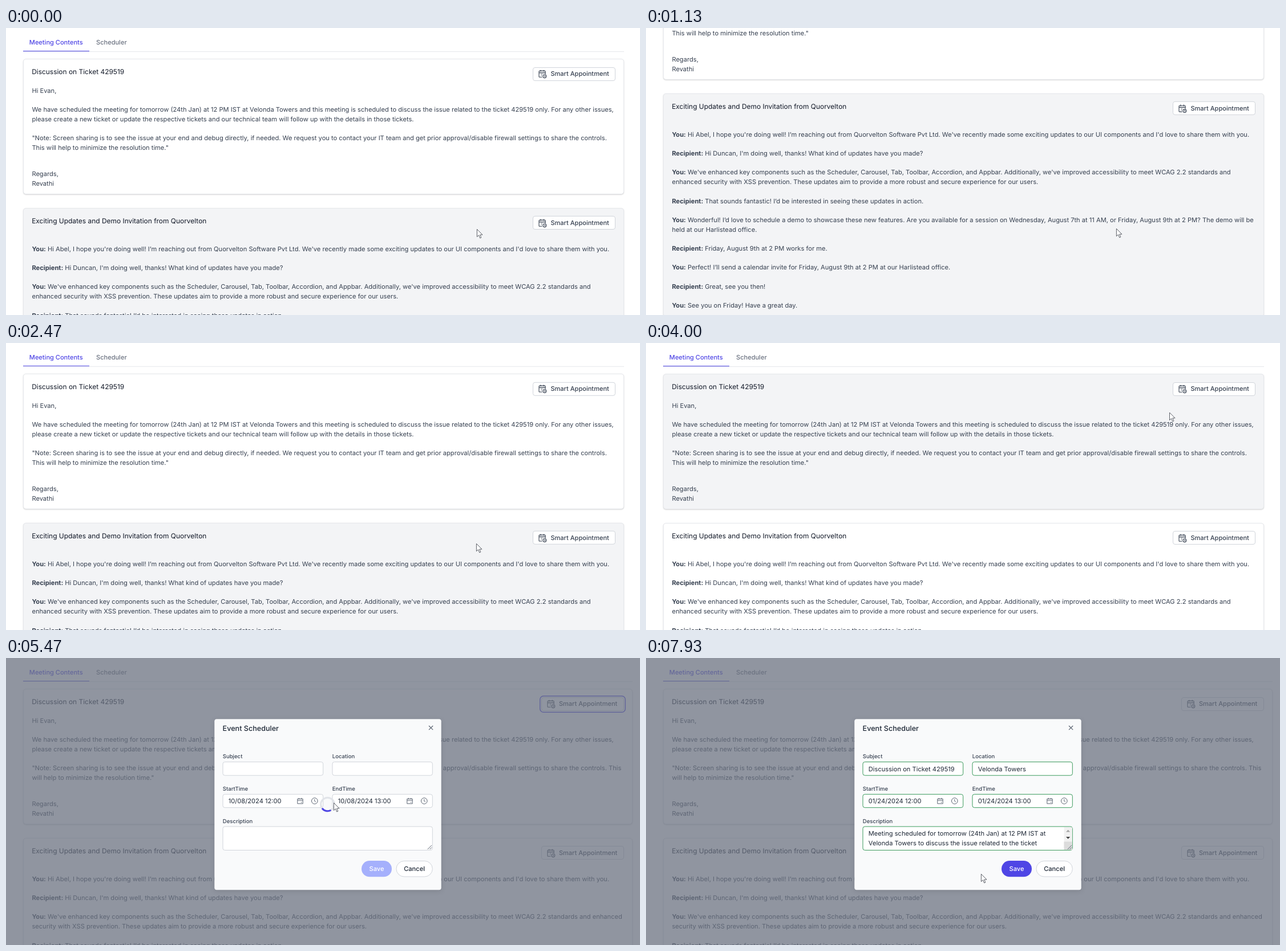
An HTML page that plays this animation: 1111x504 px, repeating every 8 s.

```html
<!DOCTYPE html>
<html lang="en">
<head>
<meta charset="utf-8">
<title>Smart appointment</title>
<style>
html, body { margin: 0; width: 100%; height: 100%; overflow: hidden; background: #fff; }
body { position: relative; font: 11.14px/16.7px Inter, sans-serif; color: #374151; text-rendering: geometricPrecision; }
body *, svg { position: absolute; box-sizing: border-box; }
.text * { position: static; }
#page { inset: 0; --right: 28px; }
.wide #page { --right: 13.5px; }
.tab, .button span { font-size: 11.05px; font-weight: 500; white-space: nowrap; }
.tab { top: 17.3px; left: 158px; color: #6b7280; }
.tab.on { left: 40.8px; color: #4f46e5; }
.rule { left: 30px; right: var(--right); top: 41px; height: 1px; background: #e5e7eb; }
.bar { left: 30px; width: 116px; top: 40px; height: 1px; background: #4f46e5; }
.card { left: 30px; right: var(--right); border: 1px solid #e5e7eb; border-radius: 5px; box-shadow: 0 1px 2px rgba(0,0,0,.16); background: #fff; }
.card.hover { background: #f3f4f6; }
.title { left: 14.2px; top: 13.9px; font-size: 11.95px; color: #111827; white-space: nowrap; }
.text { left: 14.4px; white-space: pre; }
.text .sign { position: relative; top: -4px; }
.wide .narrow-break, body:not(.wide) .wide-break { display: none; }
.button { right: 14px; top: 13.5px; width: 145px; height: 24px; border: 1px solid #d1d5db; border-radius: 4px; background: #fff; }
.button span { left: 30.4px; top: 2.6px; }
.button svg { left: 9px; top: 3.5px; }
.focus .card:first-of-type .button { box-shadow: 0 0 0 1.5px #fff, 0 0 0 3px #4f46e5; }
#overlay { inset: 0; background: rgba(107,114,128,.75); display: none; }
.wide #overlay { display: block; }
#dialog, #cursor { left: 0; top: 0; overflow: visible; }
#dialog text { fill: #1f2937; }
#dialog .label { font-size: 9.55px; font-weight: 500; fill: #374151; }
#dialog .field { fill: #fff; stroke: #d1d5db; }
.icon { fill: none; stroke: #5b6472; }
.done #dialog .field { stroke: #3b9a5c; }
.filled, .done .empty { display: none; }
.done .filled { display: inline; }
#save { fill: #a5b0fc; }
.done #save { fill: #4f46e5; }
</style>
</head>
<body>
<div id="page"></div>
<div id="overlay"></div>
<svg id="dialog" width="1111" height="504"></svg>
<svg id="cursor" width="12" height="18"><path d="M.4 .4V13.7L3.5 10.8 5.7 16 7.8 15.1 5.7 10.1H10Z" fill="#fff" stroke="#4a4e57" stroke-width=".9"/></svg>
<script>
const $ = id => document.getElementById(id);

const calendarClock = `<svg width="15" height="16" fill="none" stroke="#374151" stroke-width="1.1">
  <path d="M6.5 13.3H2.2Q1 13.3 1 12.1V3.6Q1 2.4 2.2 2.4H11Q12.2 2.4 12.2 3.6V8M1 5.6H12.2M3.8 .7V3.6M9.4 .7V3.6M5 8H6.8M5 10.3H6.3"/>
  <circle cx="10.9" cy="11.7" r="2.9"/><path d="M10.9 10.2V11.9H12.2"/></svg>`;

const you = text => `<b>You:</b> ${text}\n\n`;
const they = text => `<b>Recipient:</b> ${text}\n\n`;

const cards = [
  { top: 54, bottom: 292, title: 'Discussion on Ticket 429519', textY: 110, text:
`Hi Evan,

We have scheduled the meeting for tomorrow (24th Jan) at 12 PM IST at Velonda Towers and this meeting is scheduled to discuss the issue related to the ticket 429519 only. For any other issues,
please create a new ticket or update the respective tickets and our technical team will follow up with the details in those tickets.

"Note: Screen sharing is to see the issue at your end and debug directly, if needed. We request you to contact your IT team and get prior approval/disable firewall settings to share the controls. <br class="narrow-break">This <br class="wide-break">will help to minimize the resolution time."


<span class="sign">Regards,
Revathi</span>` },
  { top: 315.7, bottom: 708, title: 'Exciting Updates and Demo Invitation from Quorvelton', textY: 388, text:
    you(`Hi Abel, I hope you're doing well! I’m reaching out from Quorvelton Software Pvt Ltd. We've recently made some exciting updates to our UI components and I'd love to share them with you.`) +
    they(`Hi Duncan, I'm doing well, thanks! What kind of updates have you made?`) +
    you(`We've enhanced key components such as the Scheduler, Carousel, Tab, Toolbar, Accordion, and Appbar. Additionally, we've improved accessibility to meet WCAG 2.2 standards and <br class="narrow-break">enhanced <br class="wide-break">security with XSS prevention. These updates aim to provide a more robust and secure experience for our users.`) +
    they(`That sounds fantastic! I’d be interested in seeing these updates in action.`) +
    you(`Wonderful! I’d love to schedule a demo to showcase these new features. Are you available for a session on Wednesday, August 7th at 11 AM, or Friday, August 9th at 2 PM? The demo will be\nheld at our Harlistead office.`) +
    they(`Friday, August 9th at 2 PM works for me.`) +
    you(`Perfect! I’ll send a calendar invite for Friday, August 9th at 2 PM at our Harlistead office.`) +
    they(`Great, see you then!`) +
    you(`See you on Friday! Have a great day.`) },
  { top: 731.5, bottom: 923, title: 'Meeting to discuss on Ticket 603027', textY: 787, text:
`Hi Elli,

We have scheduled the meeting for today at 3 PM IST in Chennai and this meeting is scheduled to discuss the issue related to the ticket 603027 only. For any other issues, please create a new
ticket or update the respective tickets and our technical team will follow up with the details in those tickets.


Regards,
Dev` }
];

$('page').innerHTML = cards.map(c => `
  <div class="card" style="top:${c.top}px;height:${c.bottom - c.top}px">
    <span class="title">${c.title}</span>
    <span class="text" style="top:${c.textY - c.top - 9.35}px">${c.text}</span>
    <span class="button">${calendarClock}<span>Smart Appointment</span></span>
  </div>`).join('') + `
  <span class="tab on">Meeting Contents</span><span class="tab">Scheduler</span>
  <i class="rule"></i><i class="bar"></i>`;

const text = (x, y, content, attrs = '') => `<text x="${x}" y="${y + 4}" ${attrs}>${content}</text>`;
const field = (x, y, w, h, label) =>
  text(x - .2, y - 10.3, label, 'class="label"') +
  `<rect class="field" x="${x}" y="${y}" width="${w}" height="${h}" rx="3.5"/>`;
const value = (x, y, empty, filled) =>
  text(x, y, empty, 'class="empty"') + text(x, y, filled, 'class="filled"');
const dateIcons = x => `<g class="icon" transform="translate(${x} 251)">
  <path d="M-4.5 -3.6H4.9V4.8H-4.5ZM-4.5 -.9H4.9M-2 -5.3V-3M2.4 -5.3V-3M1.6 2.5H3"/>
  <circle cx="25.5" r="5.3"/><path d="M25.5 -3V.3L27.6 1.7"/></g>`;

$('dialog').innerHTML = `
  <rect x="365.3" y="107.3" width="397.4" height="300" rx="4" fill="#f9fafb" style="filter:drop-shadow(0 2px 4px rgba(0,0,0,.12))"/>
  ${text(379.6, 124.3, 'Event Scheduler', 'font-size="12.6" font-weight="500"')}
  <path class="icon" d="M741 119L748.2 126.2M748.2 119L741 126.2" stroke-width="1.2"/>
  ${field(380, 182.5, 175.7, 23.7, 'Subject')}
  ${field(572, 182.5, 175.3, 23.7, 'Location')}
  ${field(380, 239.3, 175.7, 23.4, 'StartTime')}
  ${field(572, 239.3, 175.3, 23.4, 'EndTime')}
  ${field(380, 296, 367.3, 41.5, 'Description')}
  ${value(389.8, 194.5, '', 'Discussion on Ticket 429519')}
  ${value(581.8, 194.5, '', 'Velonda Towers')}
  ${value(389.8, 251, '10/08/2024 12:00', '01/24/2024 12:00')}
  ${value(581.8, 251, '10/08/2024 13:00', '01/24/2024 13:00')}
  ${value(389.8, 308.2, '', 'Meeting scheduled for tomorrow (24th Jan) at 12 PM IST at')}
  ${value(389.8, 324.7, '', 'Velonda Towers to discuss the issue related to the ticket')}
  ${dateIcons(515.3)}${dateIcons(707.3)}
  <g class="filled"><path d="M732.5 297H746.7V336.7H732.5Z" fill="#f1f1f1"/><path d="M732.5 322.5H746.7V336.7H732.5Z" fill="#dcdcdc"/>
    <path d="M736 305.5L739.6 301.7 743.2 305.5Z" fill="#a3a3a3"/><path d="M736 314L739.6 317.8 743.2 314Z" fill="#404040"/></g>
  <path d="M738.8 336L746 328.8M742.6 336L746 332.6" class="icon"/>
  <rect id="save" x="623" y="356" width="53" height="28.3" rx="14.1"/>
  ${text(649.5, 370.2, 'Save', 'text-anchor="middle" font-weight="500" style="fill:#fff"')}
  <rect x="684" y="356.5" width="63.3" height="27.5" rx="13.7" fill="#fff" stroke="#d1d5db"/>
  ${text(715.6, 370.2, 'Cancel', 'text-anchor="middle" font-weight="500"')}
  <g class="empty" fill="none" stroke-width="3"><circle cx="563.5" cy="257" r="11.8" stroke="#e1e4e9"/>
    <path id="arc" d="M555.6 248.2A11.8 11.8 0 0 1 571.4 248.2" stroke="#4f46e5"/></g>`;

const scrollTrack = [[0, 0], [600, 0], [667, 18], [800, 105], [933, 160], [1067, 160], [1133, 201], [1333, 330],
  [1600, 425.5], [1733, 428], [2200, 428], [2267, 380], [2333, 200], [2400, 50], [2467, 0]];
const cursorTrack = [[0, 825, 353], [67, 824, 352], [3267, 824, 352], [4133, 934, 80], [4733, 934, 79],
  [5333, 574, 254], [5533, 574, 254], [6133, 506, 293], [6700, 193, 490], [7000, 228, 485],
  [7600, 228, 485], [7867, 420, 413], [7933, 587, 379]];

function sample(track, t) {
  const next = track.findIndex(p => p[0] > t);
  if (next < 0) return track[track.length - 1].slice(1);
  const a = track[next - 1], b = track[next], u = (t - a[0]) / (b[0] - a[0]);
  return a.slice(1).map((v, i) => v + (b[i + 1] - v) * u);
}

function hoveredCard(t, y) {
  if (t >= 4460) return -1;
  if (t < 2400) return t < 1995 ? 1 : 2;
  return cards.findIndex(c => y > c.top && y < c.bottom);
}

const cardNodes = document.querySelectorAll('.card');
const start = performance.now();

function draw(now) {
  const step = Math.floor(Math.max(0, now - start) % 8000 * .015 + .1);
  const t = step / .015;
  const [scroll] = sample(scrollTrack, t);
  const [x, y] = sample(cursorTrack, t);
  const hovered = hoveredCard(t, y);
  const state = document.body.classList;
  state.toggle('focus', t >= 4460 && t < 7400);
  state.toggle('wide', t >= 4590);
  state.toggle('done', t >= 7400);
  cardNodes.forEach((node, i) => node.classList.toggle('hover', i === hovered));
  $('page').style.transform = `translateY(${-scroll}px)`;
  $('cursor').style.transform = `translate(${x}px,${y}px)`;
  $('dialog').style.opacity = Math.min(1, Math.max(0, (t - 4685) / 400));
  $('arc').setAttribute('transform', `rotate(${(t - 4733) * .262} 563.5 257)`);
  requestAnimationFrame(draw);
}
draw(start);
</script>
</body>
</html>
```
